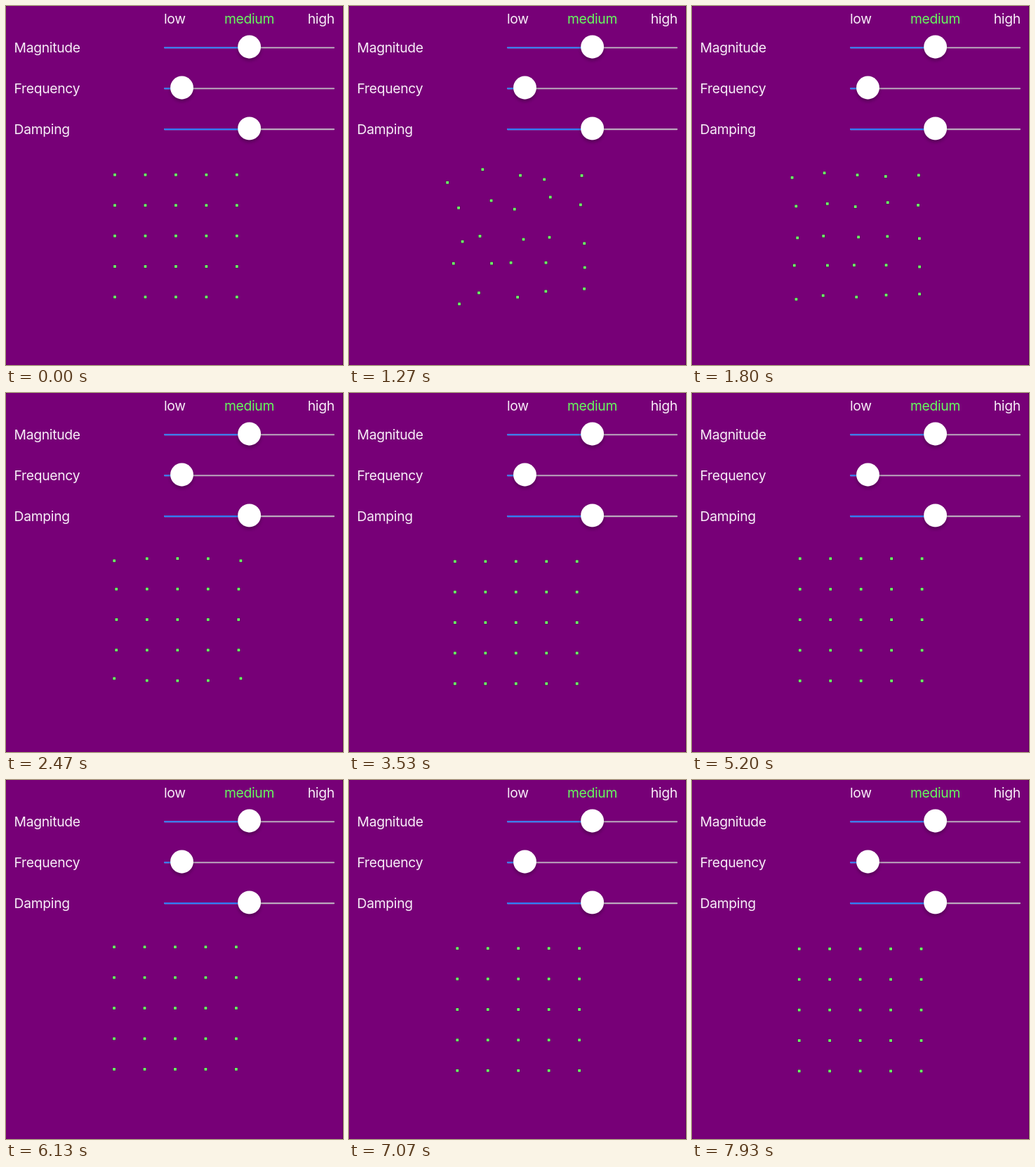
An HTML page for the animation above (8 s loop, 480 by 510 pixels).

```html
<!DOCTYPE html>
<html lang="en">
<head>
<meta charset="utf-8">
<title>Shake controls</title>
<style>
  html, body { margin: 0; width: 100%; height: 100%; overflow: hidden; background: #4a004a; }
  svg { display: block; width: 100vw; height: 100vh; }
  text { font: 19.3px Inter, "Open Sans", sans-serif; letter-spacing: -0.3px; fill: #f8eef8; }
  .active { fill: #66fa5e; }
</style>
</head>
<body>
<svg id="stage" viewBox="0 0 480 510">
  <defs>
    <filter id="shadow" x="-40%" y="-40%" width="180%" height="200%">
      <feDropShadow dx="0" dy="3" stdDeviation="2.6" flood-color="#000" flood-opacity="0.3"/>
    </filter>
  </defs>
  <rect width="479.5" height="510" rx="2.5" fill="#770077"/>
  <text x="225" y="25.3">low</text>
  <text x="346.5" y="25.3" text-anchor="middle" class="active">medium</text>
  <text x="467.8" y="25.3" text-anchor="end">high</text>
</svg>
<script>
const LOOP = 8000, STEP = 1000 / 15, KICK = 870;
const stage = document.getElementById('stage');

function add(tag, attrs, text) {
  const el = document.createElementNS('http://www.w3.org/2000/svg', tag);
  for (const key in attrs) el.setAttribute(key, attrs[key]);
  if (text) el.textContent = text;
  stage.appendChild(el);
  return el;
}

function slider(label, y, knob) {
  const bar = (width, fill) => add('rect', { x: 225, y, width, height: 2.1, rx: 1, fill });
  add('text', { x: 11.6, y: y + 7.8 }, label);
  bar(243, '#bba9bd');
  bar(knob - 225, '#2f7bf4');
  add('circle', { cx: knob, cy: y - 0.2, r: 16.4, fill: '#fff', filter: 'url(#shadow)' });
}
slider('Magnitude', 58.2, 346.6);
slider('Frequency', 116.2, 250.5);
slider('Damping', 174.1, 346.6);

// Drift of the whole grid: time, dx, dy
const drift = [
  [0, 0, 0], [KICK, 0, 0], [1800, -8.2, 0], [2467, 2.4, -4.7],
  [3533, -4.1, -0.5], [5200, -1.2, -4.5], [7067, -0.7, -0.6], [LOOP, -2.3, 0.1]
];

let seed = 7;
function spread(range) {
  seed = seed * 16807 % 2147483647;
  return (seed / 2147483647 * 2 - 1) * range;
}

const dots = Array.from({ length: 25 }, (_, i) => {
  const u = i % 5 / 2 - 1, v = Math.floor(i / 5) / 2 - 1;
  return {
    u, v, jx: spread(4), jy: spread(4.5),
    halo: add('rect', { width: 5, height: 5, fill: '#000', opacity: 0.3 }),
    core: add('rect', { width: 3.8, height: 3.8, fill: '#6cfb66' })
  };
});

const smooth = p => { p = Math.min(1, Math.max(0, p)); return p * p * (3 - 2 * p); };

function driftAt(t, axis) {
  const i = drift.findIndex(k => t < k[0]);
  const a = drift[i - 1], b = drift[i];
  return a[axis] + (b[axis] - a[axis]) * smooth((t - a[0]) / (b[0] - a[0]));
}

function place(el, x, y, size) {
  el.setAttribute('x', x - size / 2);
  el.setAttribute('y', y - size / 2);
}

function render(t) {
  const dx = driftAt(t, 1), dy = driftAt(t, 2);
  // Each dot rings on its own and dies out, while the corners lag behind
  const since = t - 1800;
  const jitter = smooth((t - KICK) / 150) * Math.exp(-since / 500) * Math.cos(since / 85);
  const corner = 3.2 * Math.exp(-(((t - 2467) / 400) ** 2));

  for (const d of dots) {
    const pull = corner * (d.u * d.v) ** 4;
    const x = 241.9 + 86.9 * d.u + dx + d.jx * jitter + d.u * pull;
    const y = 326.6 + 86.8 * d.v + dy + d.jy * jitter - d.v * pull;
    place(d.halo, x, y, 5);
    place(d.core, x, y, 3.8);
  }
}

const start = performance.now();
function tick() {
  const t = (performance.now() - start) % LOOP;
  render(Math.min(LOOP - 1, Math.floor(t / STEP + 0.1) * STEP));
  requestAnimationFrame(tick);
}
tick();
</script>
</body>
</html>
```
